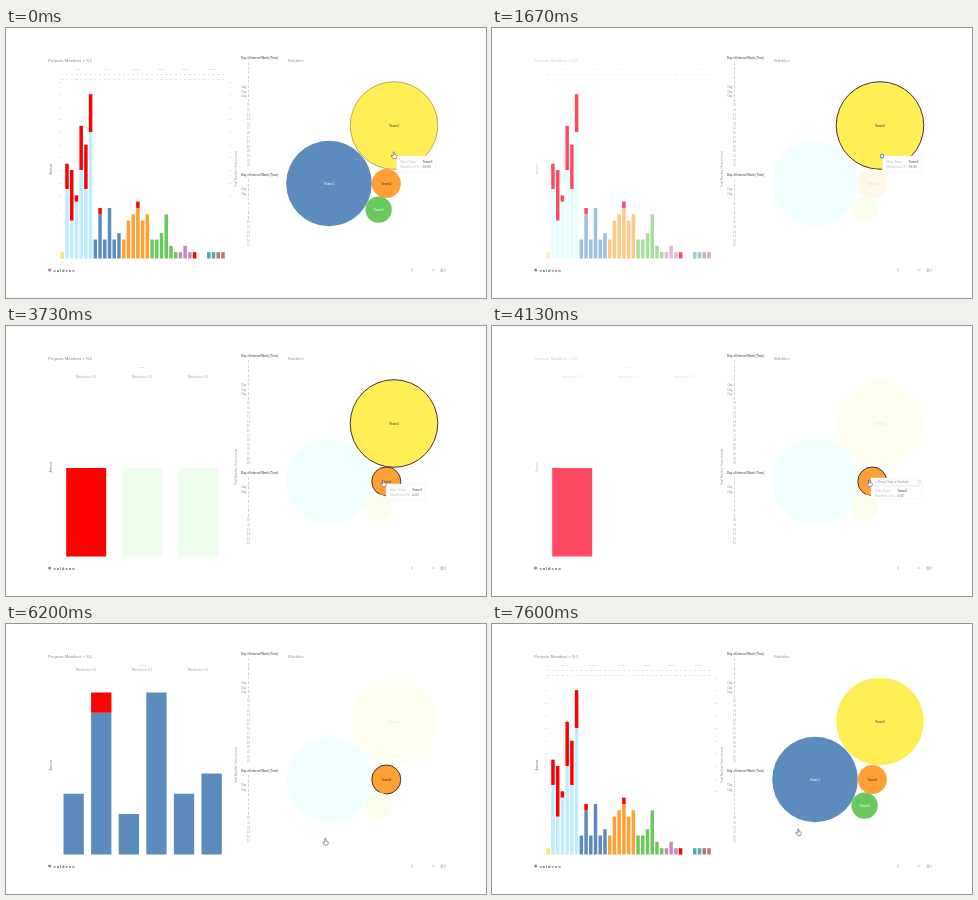
Write an HTML page that moves like this. It is 480 px wide and 270 px high and loops after 8000 ms.

```html
<!DOCTYPE html>
<html lang="en">
<head>
<meta charset="utf-8">
<title>Dashboard filtering</title>
<style>
  html, body { margin: 0; width: 100%; height: 100%; overflow: hidden; background: #fff; }
  svg { display: block; width: 480px; height: 270px; }
  text { font-family: "Liberation Sans", Arial, sans-serif; font-size: 3.2px; fill: #aaa; }
  .mid { text-anchor: middle; }
</style>
</head>
<body>
<svg id="stage" viewBox="0 0 480 270"></svg>
<script>
const LOOP = 8000, BASE = 230.5;
const stage = document.getElementById('stage');

function add(parent, tag, attrs = {}, content) {
  const node = document.createElementNS('http://www.w3.org/2000/svg', tag);
  for (const key in attrs) node.setAttribute(key, attrs[key]);
  if (content !== undefined) node.textContent = content;
  parent.append(node);
  return node;
}
const group = (parent = stage) => add(parent, 'g');
const label = (parent, x, y, text, attrs = {}) => add(parent, 'text', { x, y, ...attrs }, text);
const centred = (parent, x, y, text, attrs = {}) => label(parent, x, y, text, { class: 'mid', ...attrs });
const upright = (parent, x, y, text, style) =>
  centred(parent, 0, 0, text, { transform: `translate(${x} ${y}) rotate(-90)`, style });
const show = (node, on) => node.setAttribute('display', on ? 'inline' : 'none');

const rgb = hex => [1, 3, 5].map(i => parseInt(hex.slice(i, i + 2), 16));
function mix(from, to, k) {
  const a = rgb(from), b = rgb(to);
  return `rgb(${a.map((v, i) => Math.round(v + (b[i] - v) * k))})`;
}

// Piecewise linear value through [time, value] points
function track(t, points) {
  let [t0, v0] = points[0];
  for (const [t1, v1] of points) {
    if (t < t1) return t <= t0 ? v0 : v0 + (v1 - v0) * (t - t0) / (t1 - t0);
    [t0, v0] = [t1, v1];
  }
  return v0;
}

const colours = {
  r: ['#ff0000', '#ff4a63'], l: ['#bdeeff', '#e6ffff'], b: ['#5b8cbd', '#9dbfe2'],
  o: ['#ffa035', '#ffc886'], g: ['#6ac95c', '#a5df9a'], y: ['#ffdc7c', '#fff0b8'],
  p: ['#c989bd', '#e2b9d8'], t: ['#55aaa5', '#99ccd4'], n: ['#b37a66', '#d3b0a3'],
  m: ['#efffee', '#ffffff']
};

// Each bar is written as colour and units, stacked from the baseline: "l11r4"
function makeChart(bars, x0, pitch, width, unit) {
  const root = group(), words = group(root), parts = [];
  bars.split(' ').forEach((bar, i) => {
    let y = BASE;
    for (const [, colour, units] of bar.matchAll(/([a-z])([\d.]+)/g)) {
      const height = units * unit;
      y -= height;
      const node = add(root, 'rect', { x: x0 + i * pitch, y, width, height });
      parts.push({ node, colours: colours[colour] });
    }
  });
  return { root, words, parts };
}

const charts = [
  makeChart('y1 l11r4 l6r8 l9r1 l14r7 l11r7 l20r6 b3 b7r1 b3 b8 b3 b4 o3 o6 o7 o8r1 o6 o7 ' +
            'g3 g3 g4 g7 g2 g1 p1 p2 p1 r1 - - t1 t1 n1 n1', 54.5, 4.727, 3.5, 6.32),
  makeChart('r1 m1 m1', 60.2, 56, 40, 88.5),
  makeChart('b3 b7r1 b2 b8 b3 b4', 57.5, 27.6, 20.3, 20.25)
];

const [all, three, six] = charts.map(c => c.words);
for (const words of [all, three, six]) {
  label(words, 42, 34, 'Projects Manifest > %1', { style: 'font-size:4.3px;fill:#888' });
  upright(words, 46, 141, 'Amount', 'fill:#777');
}
const tiny = { style: 'font-size:2.3px;fill:#bbb' };
[56, 72, 101, 130, 156, 180, 206].forEach((x, i) => centred(all, x, 42, i ? 'Team ' + i : 'T', tiny));
for (let i = 0; i < 35; i++) {
  const x = 56.3 + i * 4.727;
  centred(all, x, 46.5, 'Te', tiny);
  centred(all, x, 51.5, i % 3 ? 'w.' : 'Ma', tiny);
  if (i % 2 == 0) centred(all, x, 235, i % 9, tiny);
}
for (let i = 1; i < 15; i++)
  for (const x of [53, 223]) label(all, x, BASE + 1 - i * 12.64, i * 2, tiny);

for (const [words, y] of [[three, 52], [six, 46.5]]) {
  centred(words, 136, 41.5, 'Teams', tiny);
  [80, 136, 192].forEach((x, i) => centred(words, x, y, 'Manifest in 0.' + i, { style: 'font-size:3.2px;fill:#aaa' }));
}
[80, 136, 192].forEach((x, i) => centred(three, x, 235, i, tiny));
[1, 2].forEach(i => label(three, 49, BASE + 1 - i * 88.5, i, tiny));
for (let i = 0; i < 6; i++) centred(six, 67.7 + i * 27.6, 235, i, tiny);
for (let i = 1; i < 10; i++)
  for (const x of [51, 222]) label(six, x, BASE + 1 - i * 20.25, i, tiny);

// Day filters
function dayFilter(y, rows, wordsFrom, wordRows) {
  label(stage, 235, y, 'Day of Interval Week (Time)', { style: 'font-size:3px;fill:#333' });
  for (let i = 0; i < rows; i++)
    centred(stage, 242.5, y + 6 + i * 4.6, i + 1, { style: 'font-size:2.6px;fill:#999' });
  for (let i = 0; i < wordRows; i++)
    centred(stage, 238, wordsFrom + i * 4.6, 'Day', { style: 'font-size:2.8px;fill:#888' });
}
dayFilter(31, 23, 60, 3);
dayFilter(148, 15, 162, 2);
upright(stage, 231, 141, 'Total Manifest / Sum of count', 'font-size:2.8px;fill:#999');
label(stage, 282, 34, 'Bubbles', { style: 'font-size:4.3px;fill:#999' });

// Footer
add(stage, 'circle', { cx: 43.6, cy: 242, r: 1.5, fill: '#888' });
label(stage, 47.5, 243.5, 'valdeno', { style: 'font-size:4px;fill:#555;font-weight:bold;letter-spacing:1px' });
add(stage, 'path', { d: 'M406 240.5v3M425.5 242h3M435 241h2v2.5h-2zM439 240.5v3',
  fill: 'none', stroke: '#aaa', 'stroke-width': .7 });

// Bubbles
function bubble(cx, cy, r, full, pale, name, ink) {
  const disc = add(stage, 'circle', { cx, cy, r });
  const text = centred(stage, cx, cy + 1.2, name, { style: `font-size:3.4px;fill:${ink}` });
  return { disc, text, full, pale };
}
const blue = bubble(323, 155.5, 42.8, '#5b8cbd', '#f2ffff', 'Team1', '#fff');
const yellow = bubble(388, 97.5, 43.8, '#ffee55', '#fffff1', 'Team5', '#333');
const orange = bubble(380.3, 155.5, 14.5, '#ffa035', '#fff9e8', 'Team2', '#333');
const green = bubble(372.6, 181.6, 13.2, '#6ac95c', '#f9ffec', 'Team3', '#fff');

function fadeBubble({ disc, text, full, pale }, k) {
  disc.setAttribute('fill', mix(full, pale, k));
  text.setAttribute('opacity', 1 - .85 * k);
}
function outline({ disc }, colour, width) {
  disc.setAttribute('stroke', colour);
  disc.setAttribute('stroke-width', width);
}

// Tooltips
function makeTip(width, height, top) {
  const tip = group();
  add(tip, 'rect', { width, height, fill: '#fff', stroke: '#eee', 'stroke-width': .5 });
  label(tip, 4, top, 'Main Team:', { style: 'font-size:3.2px;fill:#bbb' });
  label(tip, 4, top + 5, 'Manifest in %:', { style: 'font-size:3.2px;fill:#bbb' });
  const name = label(tip, 26, top, '', { style: 'font-size:3.4px;fill:#444' });
  const value = label(tip, 26, top + 5, '', { style: 'font-size:3.4px;fill:#777' });
  return { tip, name, value };
}
const plain = makeTip(39, 16, 6.8);
const menu = makeTip(51, 21, 13.5);
label(menu.tip, 3.5, 5.2, '✓ Keep Only  ⊘ Exclude', { style: 'font-size:3.2px;fill:#888' });
add(menu.tip, 'path', { d: 'M47 2.5h2.4v2.6h-2.4zM2 7.8h47', fill: 'none', stroke: '#bbb', 'stroke-width': .4 });
menu.name.textContent = 'Team2';
menu.value.textContent = '4.00';
menu.tip.setAttribute('transform', 'translate(379 152)');

// Pointer
const pointer = group();
const hand = add(pointer, 'path', {
  d: 'M-.8 -3q.8-.8 1.2 0v2.4l2 .6q.7.4.4 1.4l-.7 2.2h-3l-2-2.6q0-.9 1-.5l1.1.6z',
  fill: '#fff', stroke: '#555', 'stroke-width': .6 });
const ring = add(pointer, 'circle', { cx: 2, cy: 1.2, r: 1.7, fill: '#fff', stroke: '#3a9bd0', 'stroke-width': 1.1 });

const pathX = [[2000, 388], [2350, 393], [2800, 380.5], [2870, 380.5], [3200, 377.5], [5400, 377.5],
  [5930, 319.5], [7400, 319.5], [7600, 306.5]];
const pathY = [[2000, 127], [2350, 137], [2800, 132.5], [2870, 132.5], [3200, 157], [5400, 157],
  [5930, 217.5], [7400, 217.5], [7600, 208]];
const chartFade = [[1000, 0], [1400, 1], [1735, 1], [1800, 0], [3870, 0], [4100, 1], [4330, 1],
  [4530, 0], [6230, 0], [6400, 1], [7000, 1], [7070, 0]];
const othersFade = [[900, 0], [1270, 1], [6230, 1], [6400, 0]];
const yellowFade = [[3870, 0], [4070, 1], [6230, 1], [6400, 0]];

function render(t) {
  const active = t < 1735 || t >= 7000 ? 0 : t < 4330 ? 1 : 2;
  const fade = track(t, chartFade);
  charts.forEach((chart, i) => show(chart.root, i === active));
  const { parts, words } = charts[active];
  for (const { node, colours: [full, pale] } of parts) node.setAttribute('fill', mix(full, pale, fade));
  words.setAttribute('opacity', 1 - .6 * fade);

  const others = track(t, othersFade);
  fadeBubble(blue, others);
  fadeBubble(green, others);
  fadeBubble(orange, t < 3730 ? others : 0);
  fadeBubble(yellow, track(t, yellowFade));

  if (t < 900) outline(yellow, '#a08c3c', .7);
  else outline(yellow, t < 3870 ? '#4a3030' : 'none', 1);
  if (t >= 3050 && t < 3730) outline(orange, '#aa9988', .6);
  else outline(orange, t >= 3730 && t < 6270 ? '#403030' : 'none', 1);

  const x = track(t, pathX), y = track(t, pathY);
  const onOrange = t >= 3050;
  pointer.setAttribute('transform', `translate(${x} ${y})`);
  show(hand, t < 1270 || t >= 1735);
  show(ring, t >= 1270 && t < 1735);
  plain.tip.setAttribute('transform', `translate(${x + 2.5} ${y + 1})`);
  plain.name.textContent = onOrange ? 'Team2' : 'Team5';
  plain.value.textContent = onOrange ? '4.00' : '38.00';
  show(plain.tip, t < 3870);
  show(menu.tip, t >= 3870 && t < 5530);
}

const start = performance.now();
function tick() {
  render((performance.now() - start) % LOOP);
  requestAnimationFrame(tick);
}
tick();
</script>
</body>
</html>
```
